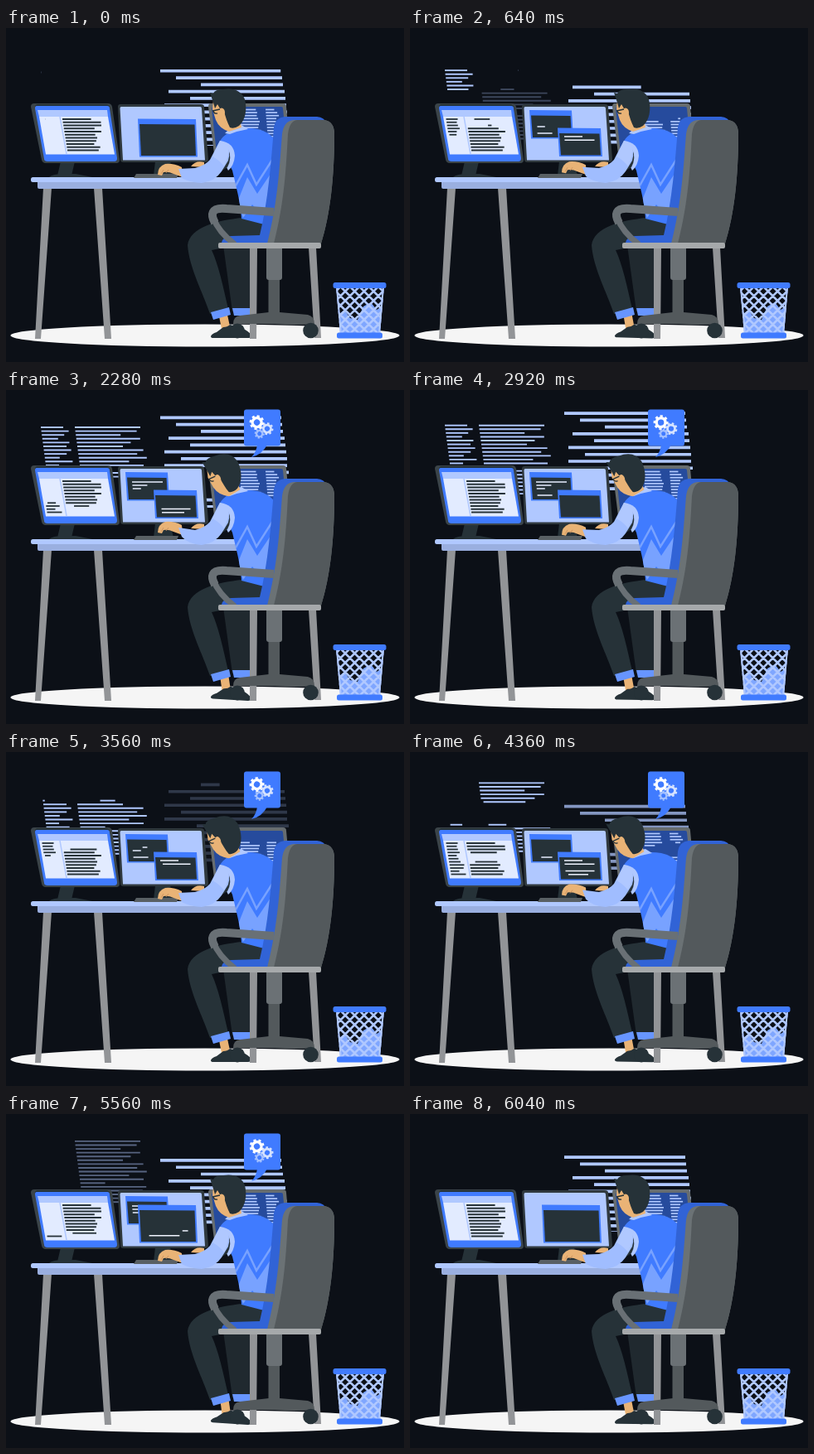
Animation, 480 px wide and 403 px high, one loop 6080 ms. Source, as an HTML page with a canvas:

```html
<!DOCTYPE html>
<html lang="en">
<head>
<meta charset="utf-8">
<title>Developer at work</title>
<style>
  html, body { margin: 0; width: 100%; height: 100%; overflow: hidden; background: #0c1017; }
  canvas { display: block; }
</style>
</head>
<body>
<canvas id="stage" width="480" height="403"></canvas>
<script>
const c = document.getElementById('stage').getContext('2d');
const LOOP = 6080, HALF = LOOP / 2, TAU = Math.PI * 2;
const BLUE = '#407bff', DEEP = '#3163d6', PALE = '#b0c8ff', DARK = '#263238',
      SKIN = '#e9b376', GREY = '#929497', SLATE = '#53595c', BG = '#0c1017';

const clamp = v => Math.max(0, Math.min(1, v));
const ramp = (t, a, b) => clamp((t - a) / (b - a));
const ease = (t, a, b) => { const k = ramp(t, a, b); return k * k * (3 - 2 * k); };
const mix = (a, b, k) => a + (b - a) * k;
const noise = n => { const v = Math.sin(n * 12.9898) * 43758.5453; return v - Math.floor(v); };
const wave = (t, cycles) => (1 - Math.cos(t / LOOP * TAU * cycles)) / 2;

function fill(color, d) { c.fillStyle = color; c.fill(new Path2D(d)); }
function line(color, width, d) {
  c.strokeStyle = color; c.lineWidth = width; c.stroke(new Path2D(d));
}
function box(color, x, y, w, h, r = 0) {
  c.fillStyle = color; c.beginPath(); c.roundRect(x, y, w, h, r); c.fill();
}
function disc(color, x, y, rx, ry = rx) {
  c.fillStyle = color; c.beginPath(); c.ellipse(x, y, rx, ry, 0, 0, TAU); c.fill();
}
function group(draw) { c.save(); draw(); c.restore(); }
function turn(x, y, deg) { c.translate(x, y); c.rotate(deg * Math.PI / 180); c.translate(-x, -y); }

// A text row showing only part of its width, shrinking towards an anchor.
function row(color, x, y, w, h, part, anchor = 0) {
  if (part > 0) box(color, x + w * (1 - part) * anchor, y - h / 2, w * part, h);
}
// Rows are wiped from the top and written again a little later.
function rewrite(t, r, wipeAt, wipeStep, writeAt, writeStep) {
  const written = clamp((t - writeAt) / writeStep - r);
  return written || 1 - clamp((t - wipeAt) / wipeStep - r);
}
// Rows are written from the top and wiped afterwards.
function typeWipe(t, r, writeStep, wipeAt, wipeStep) {
  return clamp(t / writeStep - r) - clamp((t - wipeAt) / wipeStep - r);
}

const RIGHT = [[186, 332], [205, 333], [235, 334], [196, 336], [222, 337], [191, 338],
               [211, 339], [191, 339], [230, 341]];
const SIDE = [27, 33, 27, 19, 32, 28, 33, 27, 18, 33, 16, 28];
const MAIN = [79, 74, 54, 77, 65, 55, 79, 71, 82, 60, 77, 30];

function floatingCode(t) {
  const s = t % HALF;
  group(() => {
    c.beginPath(); c.rect(0, 0, 480, 142); c.clip();
    const top = 53.5 - t * .0037;
    c.globalAlpha = 1 - ramp(t, 5200, 5860);
    for (let r = 0; r < 19; r++) {
      const passed = clamp((s + 80) / 122 - r);
      row(PALE, 42 + r * .6, top + r * 4.58, SIDE[r % 12], 1.9,
          (t < HALF ? passed : 1 - passed) * ramp(t, 0, 100));
    }
    c.globalAlpha *= ramp(t, 450, 1100);
    for (let r = 0; r < 19; r++)
      row(PALE, 83 + r * .6, top + r * 4.58, MAIN[r % 12], 1.9,
          rewrite(s, r, -55, 122, 640, 115), .6);
    // The right block starts again after it has faded away.
    const age = t < 3680 ? t + LOOP : t;
    const base = 65.7 - (age - 4360) * .0081;
    c.globalAlpha = t < 3680 ? 1 - ramp(t, 3200, 3660) : ramp(t, 3700, 4600);
    for (let r = 0; r < 14; r++) {
      const [a, b] = RIGHT[r % 9];
      const anchor = s > 700 + r * 180 ? 1 : 0;
      row(PALE, a, base + r * 8.27, b - a, 3.7, rewrite(s, r, 0, 188, 700, 180), anchor);
    }
  });
}

function leftMonitor(s) {
  fill(DARK, 'M66 161H83L79 178H62Z M52 180Q56 176 70 176H84L104 180Z');
  fill('#3b4449', 'M34 91H123Q127 91 128 95L137 159Q137 163 133 163H48Q44 163 43 159L30 95Q30 91 34 91Z');
  fill(DARK, 'M37 92H122L125 94 133 161H47L35 94Z');
  fill(BLUE, 'M37 94H122Q125 94 125 97L134 157Q134 161 131 161H50Q46 161 46 158L35 97Q35 94 37 94Z');
  fill(PALE, 'M38 99H122L123 107H40Z');
  fill('#e2ebff', 'M40 107H123L131 152.5H48Z');
  line(PALE, 1.5, 'M65 107L73 152');
  for (let r = 0; r < 11; r++) {
    const y = 110 + r * 3.75, shift = r * .6;
    row(DARK, 43.5 + shift, y, 9 + 9 * noise(r + 3), 1.8, typeWipe(s, r, 112, 1590, 93), .3);
    row(DARK, 68 + shift, y, 27 + 23 * noise(r * 3 + 8), 1.8, rewrite(s, r, 60, 200, 530, 205), .6);
  }
}

function windowFrame(x, y, w, h) {
  fill(BLUE, `M${x} ${y}L${x + w} ${y + .6}L${x + w + 2} ${y + h}L${x + 2} ${y + h}Z`);
  fill(DARK, `M${x + 2} ${y + 6.5}L${x + w - 1.5} ${y + 7}L${x + w} ${y + h - 1.5}L${x + 4} ${y + h - 1.5}Z`);
}

function middleMonitor(t, s) {
  fill(DARK, 'M180 161H198L202 178H178Z');
  fill('#30393e', 'M138 92H235Q239 92 239 95L244 158Q244 162 240 162H142Q138 162 138 159L135 95Q135 92 138 92Z');
  fill(PALE, 'M139 95H234Q236 95 236 97L240 159.5H141L137.5 97Q137.5 95 139 95Z');
  const big = 1 - ease(t, 100, 560) + ease(t, 5080, 5480);
  group(() => {
    c.globalAlpha = ramp(t, 250, 480) - ramp(t, 5640, 5900);
    windowFrame(144, 99, 51, 34.5);
    [37, 18, 10, 0, 18].forEach((w, r) =>
      row('#e6edff', 152 + r * .4, 111 + r * 4, w, 1.5, rewrite(s, r, 0, 310, 1340, 310), 1));
  });
  const x = mix(178, 159, big), y = mix(120.5, 109.5, big), k = mix(1, 1.36, big);
  windowFrame(x, y, mix(52, 70, big), mix(34.5, 46, big));
  group(() => {
    c.globalAlpha = ramp(t, 100, 350);
    [22, 36, 0, 35, 27].forEach((w, r) =>
      row('#f0f4ff', x + (8 + r * .5) * k, y + (10.5 + r * 4.2) * k, w * k, 1.5,
          typeWipe(s, r, 270, 1460, 275), 1));
  });
}

function rightMonitor(s) {
  fill('#676d70', 'M247 91H334Q338 91 338 95L344 160H252L244 95Q244 91 247 91Z');
  fill('#264b9d', 'M249 95H332Q334 95 334 97L340 160H255L248 97Z');
  for (let r = 0; r < 11; r++) {
    const y = 98.5 + r * 3.6;
    row(PALE, 282 + r * .2, y, 24 - 6 * noise(r + 20), 1.7, rewrite(s, r, 0, 150, 640, 150));
    row(PALE, 313 + r * .3, y, 17 - 7 * noise(r + 41), 1.7, rewrite(s, r, 0, 170, 760, 160), 1);
  }
}

function desk() {
  fill(GREY, 'M45 193H55L42 375H35Z M106 193H116L127 375H119Z');
  box('#9aafe0', 38, 184, 250, 10, 2);
  box(PALE, 30, 180, 260, 6, 2.5);
  fill('#596064', 'M157 176H208L206 181H154Z');
}

function basket() {
  group(() => {
    c.clip(new Path2D('M398 313H456L451 369H403Z'));
    fill('#7fa6ff', 'M402 345L408 340 415 350 424 352 431 336 440 331 447 340 453 336 452 370H402Z');
    let d = '';
    for (let x = 335; x < 520; x += 11.4) d += `M${x} 312l58 58M${x} 312l-58 58`;
    line(PALE, 2.6, d);
  });
  line(PALE, 2, 'M399 313L404 369M455 313L450 369');
  box(BLUE, 394.5, 307, 64, 7, 2.5);
  box(BLUE, 399, 367.5, 55, 7, 2.5);
}

function legs(t) {
  fill('#20292f', 'M262 262H297V342H273Z');
  fill('#6795ff', 'M273 338H297V347H275Z');
  group(() => {
    turn(276, 370, 4 * wave(t, 17));
    fill(SKIN, 'M257 348L267 346 270 360 260 363Z');
    fill(DARK, 'M247 372Q248 369 254 367L262 361Q267 361 270 358L278 360Q289 363 295 369V372Q295 374 292 374H250Q247 374 247 372Z');
  });
  fill(DARK, 'M318 228L285 229C255 232 222 240 219 262C221 290 238 320 246 345L268 339C262 312 256 285 248 268L318 254Z');
  fill('#6795ff', 'M247 343L269 337 271 346 250 352Z');
}

function torso() {
  const vest = 'M257 139C262 125 282 118 303 122Q318 125 325 136L320 205 315 238 284 230C283 210 277 190 273 172Z';
  fill(BLUE, vest);
  group(() => {
    c.clip(new Path2D(vest));
    fill('#78a2ff', 'M279 210L291 180 303 200 323 170V203L307 225 297 213 286 229Z');
    line('#78a2ff', 2.5, 'M270 203L291 165 302 189 325 153');
  });
  fill(PALE, 'M264 127Q272 118 284 117L292 122Q280 124 270 128Z');
}

function head(t) {
  const nod = ease(t, 1480, 1960) - ease(t, 4640, 5200);
  group(() => {
    c.translate(-nod, 2 * nod);
    turn(275, 122, -12 * nod);
    fill(SKIN, 'M250 87L249 98 253 111Q257 121 269 125L284 120 280 98 262 88Z');
    fill(DARK, 'M248 84L246 78 250 79Q252 74 262 74Q282 71 288 86C291 98 289 111 281 118Q275 122 270 120C267 114 265 108 263 101L258 97 255 92 252 97 250 90Z');
    disc(SKIN, 260, 102, 4, 5.5);
    line(DARK, 1.3, 'M249 100L258 98M250 100Q251 104 255 103');
  });
}

function arm(t) {
  const lift = 5 * wave(t, 12);
  fill(SKIN, 'M223 167Q229 159 239 162V168Z');
  group(() => {
    c.translate(0, -lift);
    fill(SKIN, 'M183 177Q183 167 192 164Q202 163 212 168L213 180 202 176Q196 173 190 174L188 178Z');
    line('#c48d5c', .8, 'M187 176L190 171M193 175L196 171');
  });
  fill(PALE, 'M258 136Q275 138 276 154Q275 166 268 172L262 160Z');
  fill(DARK, 'M268 146Q273 157 267 168L261 172Z');
  const wrist = 170 - lift * .8;
  fill('#a0bdff', `M208 ${wrist}L212 ${wrist + 11}Q220 186 236 187Q252 185 260 173L268 160Q272 148 264 139L258 136Q252 147 246 159Q240 166 228 169Z`);
  fill(PALE, 'M258 136Q266 138 269 146Q268 158 263 167Q258 160 249 155Z');
}

function chair() {
  fill(DEEP, 'M260 259Q262 251 272 251L306 250C316 210 320 160 323 120Q325 108 336 107H375Q384 108 386 114L350 150 330 259Z');
  fill('#6b7275', 'M347 111H384Q396 113 396 128C396 180 391 225 380 260H315C328 210 330 165 333 128Q335 112 347 111Z');
  fill(SLATE, 'M351 111H384Q396 113 396 128C396 180 391 225 380 260H323C336 210 338 165 340 128Q342 112 351 111Z');
  line('#697075', 10, 'M323 222L266 218C246 216 247 226 252 235');
  line('#697075', 7, 'M250 229C255 243 264 252 276 261');
  fill(GREY, 'M294 265H303L302 375H294Z M365 265H374L380 374H372Z');
  box(SLATE, 316.5, 300, 13.5, 48);
  box('#6b7175', 314, 262, 19, 42, 3);
  fill(SLATE, 'M274 357Q274 348 282 347L317 343H330L364 346Q372 348 372 357Q350 359 324 357Z');
  disc(DARK, 279, 365.5, 9);
  disc(DARK, 367.5, 365, 9.3);
  box('#a6a9ab', 256, 259, 124, 7, 2);
}

function gear(color, x, y, r, angle) {
  group(() => {
    c.translate(x, y); c.rotate(angle);
    c.strokeStyle = color;
    c.lineWidth = r * .38;
    c.beginPath(); c.arc(0, 0, r * .6, 0, TAU); c.stroke();
    c.lineWidth = r * .28;
    for (let i = 0; i < 8; i++) {
      c.beginPath(); c.arc(0, 0, r * .86, i * TAU / 8, i * TAU / 8 + .4); c.stroke();
    }
  });
}

function bubble(t) {
  const size = ease(t, 700, 960) - ease(t, 5820, 6020);
  if (size <= 0) return;
  group(() => {
    c.translate(297, 81); c.scale(size, size); c.translate(-297, -81);
    box(BLUE, 287, 23.4, 44, 44, 3);
    fill(BLUE, 'M303 66Q302 75 296 81Q309 78 315 66Z');
    const spin = t / LOOP * TAU;
    gear('#fff', 302.6, 39.2, 9, spin);
    gear('#d6e3ff', 315, 46.7, 7.5, -spin);
    gear('#a6c2ff', 305.7, 52.7, 6, spin);
  });
}

function draw(t) {
  const s = t % HALF;
  c.fillStyle = BG; c.fillRect(0, 0, 480, 403);
  disc('#f5f5f5', 240, 371, 234.5, 13.5);
  floatingCode(t);
  rightMonitor(s);
  middleMonitor(t, s);
  leftMonitor(s);
  desk();
  basket();
  legs(t);
  torso();
  head(t);
  arm(t);
  chair();
  bubble(t);
}

const start = performance.now();
function tick() {
  draw((performance.now() - start) % LOOP);
  requestAnimationFrame(tick);
}
tick();
</script>
</body>
</html>
```
